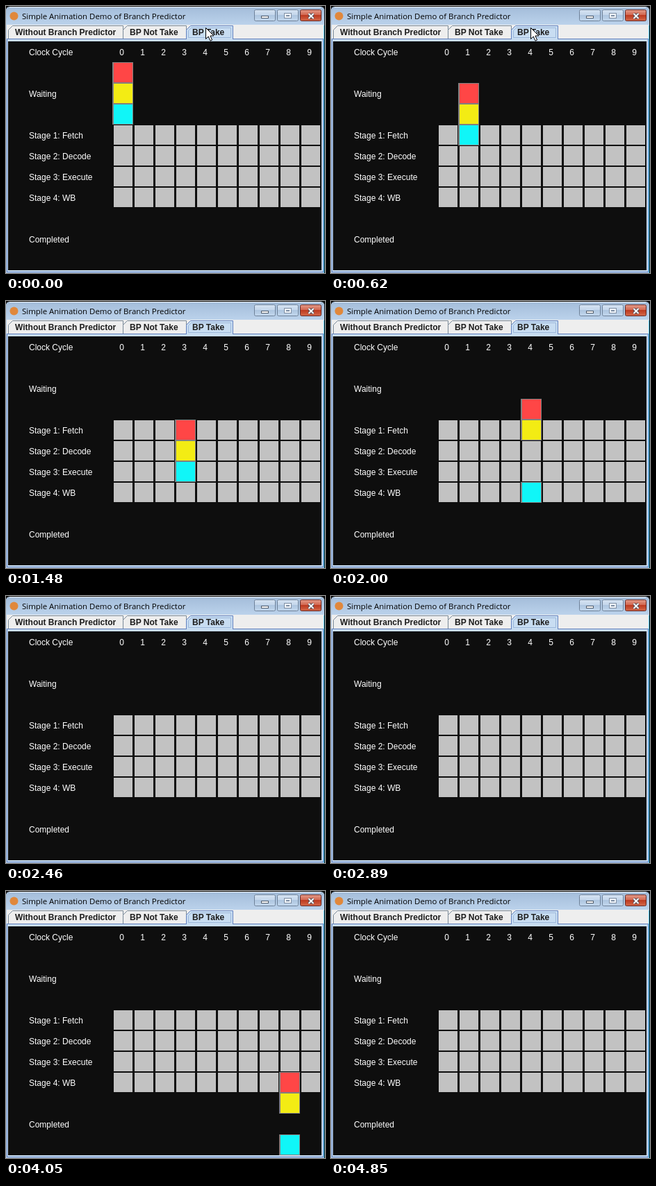
These frames come from a looping animation (459x385 px, 5.75 s). An HTML page:

```html
<!DOCTYPE html>
<html lang="en">
<head>
<meta charset="utf-8">
<title>Branch Predictor Demo</title>
<style>
  html, body { margin: 0; width: 100%; height: 100%; overflow: hidden; background: #0e0e0e; }
  svg { display: block; }
  text { white-space: pre; }
  .title { font: 11.45px "Open Sans", "Noto Sans", sans-serif; fill: #000; }
  .tab { font: bold 12px "Liberation Sans", Arial, sans-serif; fill: #1c1c1c; }
  .label { font: 12px "Liberation Sans", Arial, sans-serif; fill: #fff; }
</style>
</head>
<body>
<svg id="stage" width="459" height="385" viewBox="0 0 459 385">
  <defs>
    <linearGradient id="bar" x2="0" y2="1">
      <stop offset="0" stop-color="#a3bcd9"/><stop offset="1" stop-color="#bcd3ec"/>
    </linearGradient>
    <linearGradient id="button" x2="0" y2="1">
      <stop offset="0" stop-color="#d6e3f2"/><stop offset=".5" stop-color="#c2d5ea"/>
      <stop offset=".5" stop-color="#aec6e0"/><stop offset="1" stop-color="#c3d8ee"/>
    </linearGradient>
    <linearGradient id="close" x2="0" y2="1">
      <stop offset="0" stop-color="#e39a88"/><stop offset=".5" stop-color="#d0634c"/>
      <stop offset=".5" stop-color="#bd3a20"/><stop offset="1" stop-color="#d4694a"/>
    </linearGradient>
  </defs>

  <!-- window frame -->
  <path d="M0 385V7Q0 1 6 1H452Q458 1 458 7V385Z" fill="#bcd3ec"/>
  <path d="M0 28V7Q0 1 6 1H452Q458 1 458 7V28Z" fill="url(#bar)"/>
  <path d="M5 1.5H453" stroke="#f2f7fc"/>
  <path d="M457.5 28V385" stroke="#4fc8ee"/>
  <circle cx="11.5" cy="14.5" r="6" fill="#e0883c"/>
  <text class="title" x="23" y="19">Simple Animation Demo of Branch Predictor</text>

  <!-- window buttons -->
  <g stroke="#6f8299">
    <rect x="357.5" y="5.5" width="30" height="16" rx="2" fill="url(#button)"/>
    <rect x="390.5" y="5.5" width="30" height="16" rx="2" fill="url(#button)"/>
    <rect x="423.5" y="5.5" width="30" height="16" rx="2" fill="url(#close)" stroke="#6b2c28"/>
    <rect x="367.5" y="14.5" width="10" height="3" fill="#fff" stroke="#535d6b"/>
    <rect x="400.5" y="10.5" width="10" height="7" fill="#eef3f9" stroke="#8090a5"/>
    <rect x="403.5" y="13.5" width="4" height="1" fill="#aec6e0" stroke="#8090a5"/>
  </g>
  <path d="M435.5 11l7 7m0-7l-7 7" stroke="#53505c" stroke-width="4"/>
  <path d="M435.5 11l7 7m0-7l-7 7" stroke="#fff" stroke-width="2"/>

  <!-- tabs and panel -->
  <rect x="1" y="27" width="456" height="20" fill="#eee"/>
  <rect x="1.5" y="47.5" width="455" height="336" fill="#c8ddf2" stroke="#6382bf"/>
  <g id="tabs"></g>
  <rect x="3" y="51" width="451" height="330" fill="#0e0e0e"/>

  <g id="board"></g>
  <g id="blocks"></g>
  <path id="cursor" d="M.5.5V16.5L4.2 13 7 19.2 9.6 18 6.9 12H12Z" fill="#fff" stroke="#000"/>
</svg>
<script>
const LOOP = 5750, SIZE = 30, LEFT = 153, TOP = 81;
const byId = id => document.getElementById(id);

function add(parent, tag, attrs, text = "") {
  const el = document.createElementNS("http://www.w3.org/2000/svg", tag);
  for (const key in attrs) el.setAttribute(key, attrs[key]);
  el.textContent = text;
  return parent.appendChild(el);
}

function addTab(x, right, textX, name, active) {
  const tabs = byId("tabs");
  add(tabs, "path", {
    d: `M${x + .5} ${active ? 48 : 47}V34.5L${x + 6.5} 28.5H${right - .5}V${active ? 48 : 47}`,
    fill: active ? "#c8ddf2" : "#eee",
    stroke: active ? "#6382bf" : "#7a8a99"
  });
  if (active) add(tabs, "path", {
    d: `M${x + 3.5} 45.5V35.5L${x + 7.5} 31.5H${right - 3.5}V45.5Z`,
    fill: "none", stroke: "#9db8da"
  });
  add(tabs, "text", { class: "tab", x: textX, y: 42 }, name);
}
addTab(3, 169, 13, "Without Branch Predictor");
addTab(168, 260, 178, "BP Not Take");
addTab(259, 327, 268, "BP Take", true);

const board = byId("board");
const label = (name, y) => add(board, "text", { class: "label", x: 33, y }, name);
label("Clock Cycle", 71);
label("Waiting", 131);
["Fetch", "Decode", "Execute", "WB"].forEach((name, i) => label(`Stage ${i + 1}: ${name}`, 191 + SIZE * i));
label("Completed", 341);

// Cells and block faces share one size inside their 30 px square.
const face = (parent, x, y, fill) =>
  add(parent, "rect", { x: x + 2, y: y + 1, width: 27, height: 28, fill });

for (let c = 0; c < 10; c++) {
  const x = LEFT + SIZE * c;
  add(board, "text", { class: "label", x: x + 13.5, y: 71, "text-anchor": "middle" }, c);
  for (let r = 3; r < 7; r++) face(board, x, TOP + SIZE * r, "#c2c2c2");
}

const blocks = ["#ff4646", "#f3ec14", "#10f6f8"].map(fill => {
  const g = add(byId("blocks"), "g", {});
  add(g, "rect", { width: SIZE, height: SIZE, fill: "#808080" });
  face(g, 0, 0, fill);
  return g;
});

// [start ms, clock cycle]; null clears the blocks
const steps = [
  [0, 0], [460, null], [620, 1], [920, null], [1040, 2], [1480, 3],
  [1880, null], [2000, 4], [2460, null], [2580, 5], [2890, null],
  [3040, 6], [3500, 7], [3900, null], [4050, 8], [4450, 9], [4850, null]
];
const pointer = [[0, [287, 31]], [770, [447, 10]], [920, null]];
const at = (table, t) => table.filter(([start]) => start <= t).pop()[1];

// The flush at cycle 4 sends the two younger instructions back two rows.
function rowsAt(cycle) {
  const red = cycle < 4 ? cycle : cycle - 2;
  return [red, red + 1, Math.min(cycle + 2, 9)];
}

function place(el, pos) {
  el.style.display = pos ? "" : "none";
  if (pos) el.setAttribute("transform", `translate(${pos})`);
}

function draw(t) {
  const cycle = at(steps, t);
  const rows = cycle === null ? [] : rowsAt(cycle);
  blocks.forEach((el, i) =>
    place(el, i in rows ? [LEFT + SIZE * cycle, TOP + SIZE * rows[i]] : null));
  place(byId("cursor"), at(pointer, t));
}

const start = performance.now();
function tick() {
  draw((performance.now() - start) % LOOP);
  requestAnimationFrame(tick);
}
tick();
</script>
</body>
</html>
```
